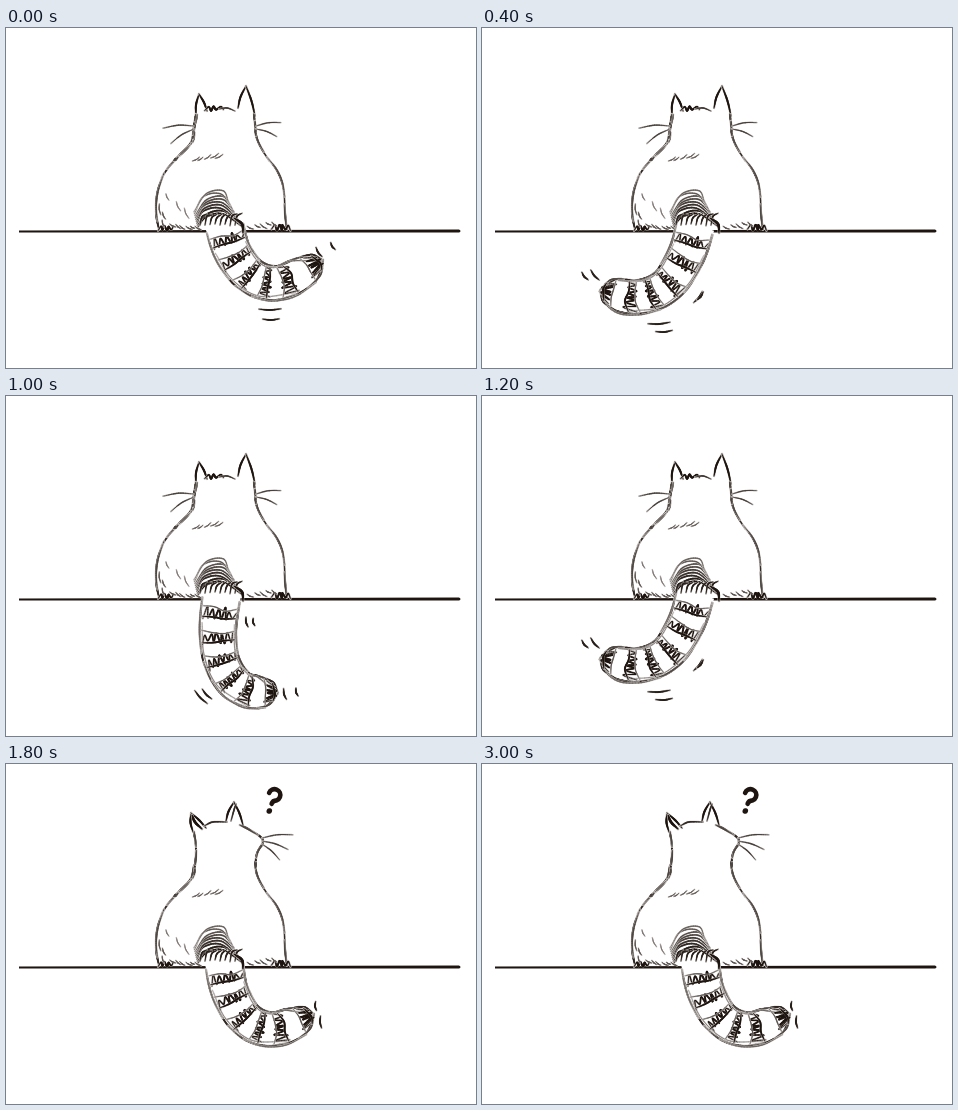
Recreate the animation shown at these times as an HTML page with a canvas. Size 470 px wide and 340 px high, loop 3200 ms.

```html
<!DOCTYPE html>
<html lang="en">
<head>
<meta charset="utf-8">
<title>Cat on a ledge</title>
<style>
html, body { margin: 0; width: 100%; height: 100%; overflow: hidden; background: #fff; }
canvas { display: block; width: 470px; height: 340px; }
</style>
</head>
<body>
<canvas id="stage" width="470" height="340"></canvas>
<script>
const ctx = document.getElementById('stage').getContext('2d');
const STEP = 200;
// One letter per step: tail right, centre, left, then glance and stare.
const POSES = 'ACLCACLCAQFFFFFQ';

let seed = 1;
function rnd(size = 1) {
  seed = (seed * 16807) % 2147483647;
  return (seed / 2147483647 - 0.5) * size;
}

const shade = g => `rgb(${30 + g * 210},${21 + g * 216},${16 + g * 219})`;
const polar = (x, y, a, r) => [x + Math.cos(a) * r, y + Math.sin(a) * r];
const rad = deg => deg * Math.PI / 180;

// Point on a Catmull-Rom curve, u from 0 to 1.
function at(p, u) {
  const last = p.length / 2 - 1, t = u * last;
  const i = Math.max(0, Math.min(last - 1, Math.floor(t))), f = t - i;
  return [0, 1].map(k => {
    const v = j => j < 0 ? 2 * p[k] - p[2 + k]
      : j > last ? 2 * p[2 * last + k] - p[2 * last - 2 + k] : p[2 * j + k];
    const a = v(i - 1), b = v(i), c = v(i + 1), d = v(i + 2);
    return b + 0.5 * f * (c - a + f * (2 * a - 5 * b + 4 * c - d + f * (3 * (b - c) + d - a)));
  });
}

// Tapered brush stroke with a soft rim through points x, y, x, y...
function ink(w, g, ...p) {
  const n = Math.max(6, p.length * 3);
  const pts = Array.from({ length: n + 1 }, (_, i) => at(p, i / n));
  ctx.lineCap = ctx.lineJoin = 'round';
  ctx.strokeStyle = shade(0.75 + g * 0.25);
  ctx.lineWidth = w * 0.7 + 0.9;
  ctx.beginPath();
  pts.forEach(q => ctx.lineTo(...q));
  ctx.stroke();
  ctx.strokeStyle = shade(g);
  for (let i = 0; i < n; i++) {
    ctx.lineWidth = w * (0.35 + 0.65 * Math.sin(Math.PI * (i + 0.5) / n));
    ctx.beginPath();
    ctx.moveTo(...pts[i]);
    ctx.lineTo(...pts[i + 1]);
    ctx.stroke();
  }
}

// Pencil-like line: short overlapping strokes that wander off the curve.
function sketch(w, passes, curve) {
  for (let k = 0; k < passes; k++) {
    let u = 0;
    while (u < 0.95) {
      const end = Math.min(1, u + 0.35 + rnd(0.2));
      const dx = rnd(k * 1.5), dy = rnd(k * 1.5);
      const p = [0, 1, 2, 3].flatMap(j => {
        const [x, y] = curve(u + (end - u) * j / 3);
        return [x + dx, y + dy];
      });
      ink(w * (1 - k * 0.15), k * 0.15 + 0.08, ...p);
      u = end - 0.04 + k * 0.1;
    }
  }
}

const along = (...p) => u => at(p, u);

// Row of short hairs between two points, all leaning one way.
function hairs(n, x0, y0, x1, y1, deg, len, w = 1.1, g = 0.3) {
  for (let i = 0; i < n; i++) {
    const u = i / (n - 1);
    const x = x0 + (x1 - x0) * u + rnd(2), y = y0 + (y1 - y0) * u + rnd(2);
    const a = rad(deg) + rnd(0.4), l = len * (1 + rnd(0.5));
    ink(w, g, x, y, ...polar(x, y, a + 0.15, l / 2), ...polar(x, y, a, l));
  }
}

function scribble(n, x0, y0, x1, y1, height, w) {
  const p = [];
  for (let i = 0; i <= n; i++) {
    p.push(x0 + (x1 - x0) * i / n + rnd(2), y0 + (y1 - y0) * i / n + (i % 2 ? height : 0) + rnd(1.5));
  }
  ink(w, 0, ...p);
}

function whiskers(x, y, n, deg, spread, len) {
  for (let i = 0; i < n; i++) {
    const a = rad(deg + spread * i), l = len * (1 - i * 0.12);
    const y0 = y + i * 3;
    ink(1.2, 0.2, x, y0, ...polar(x, y0, a - rad(spread / 4), l / 2), ...polar(x, y0, a, l));
  }
}

function ear(x0, y0, tipX, tipY, x1, y1) {
  const mid = (x, y, out) => [(x + tipX) / 2 + out, (y + tipY) / 2];
  ink(2, 0, x0, y0, ...mid(x0, y0, -1.5), tipX, tipY);
  ink(2, 0, tipX, tipY, ...mid(x1, y1, 1), x1, y1);
}

function ledge() {
  ctx.fillStyle = shade(0);
  ctx.beginPath();
  ctx.moveTo(13, 202.4);
  ctx.lineTo(453, 201.4);
  ctx.quadraticCurveTo(456, 203, 453, 204.6);
  ctx.lineTo(13, 204.4);
  ctx.fill();
}

function body() {
  const left = along(188, 101, 185, 115, 170, 131, 157, 147, 151, 167, 150, 185, 153, 202);
  const right = along(249, 101, 252, 114, 262, 131, 273, 146, 278, 164, 279, 184, 281, 202);
  sketch(1.9, 2, left);
  sketch(1.7, 2, right);
  sketch(2.2, 3, u => left(0.03 + u * 0.32));
  scribble(7, 152, 202, 167, 202, -4, 1.9);
  scribble(8, 266, 202, 284, 202, -5, 2);
  hairs(6, 164, 197, 190, 199, 35, 6);
  hairs(5, 242, 198, 266, 194, 30, 7);
  hairs(5, 186, 133, 210, 130, -38, 8, 1, 0.35);
  hairs(3, 154, 176, 157, 192, 75, 9);
  hairs(3, 160, 166, 179, 180, 70, 9, 0.9, 0.45);
}

// Fur fanning over the root of the tail.
function rump() {
  for (let i = 0; i < 9; i++) {
    const rise = 6 + i * 2.9, lean = rnd(4);
    ink(1.8 - i * 0.07, i * 0.045, 192 - i * 0.5, 199 - i * 1.9, 199 + lean, 195 - rise,
      216 + lean, 192 - rise, 237 - i * 1.8, 200 - i * 3.2 + rnd(2));
  }
  for (let i = 0; i < 8; i++) {
    const x = 194 + i * 5;
    ink(1.5, 0.05, x, 197 + rnd(3), x + 2, 189 + rnd(2), x + 7, 186 + rnd(3));
  }
  ink(2.6, 0, 228, 190, 236, 196, 237, 205);
}

function tail(...spine) {
  const side = (u, v) => {
    const [x0, y0] = at(spine, u - 0.01), [x1, y1] = at(spine, u + 0.01);
    const round = Math.sqrt(Math.max(0, 1 - Math.max(0, (u - 0.83) / 0.17) ** 2));
    return polar((x0 + x1) / 2, (y0 + y1) / 2, Math.atan2(y1 - y0, x1 - x0) + Math.PI / 2, v * (19 - 3 * u) * round);
  };
  ctx.fillStyle = '#fff';
  ctx.beginPath();
  for (const v of [-1, 1]) {
    for (let i = 0; i <= 40; i++) ctx.lineTo(...side(v < 0 ? i / 40 : 1 - i / 40, v));
  }
  ctx.fill();
  for (const v of [-1, 1]) {
    sketch(1.8, 3, u => side(0.04 + u * 0.96, v));
    ink(1, 0.5, ...[0.2, 0.4, 0.6, 0.8].flatMap(u => side(u, v * 0.88)));
  }

  // Each stripe is a loose zigzag between two uneven rims.
  for (let u = 0.13; u < 0.97; u += 0.163) {
    const rim = d => [-0.9, -0.3, 0.3, 0.9].flatMap(v => side(u + d + rnd(0.02) - v * v * 0.015, v));
    const zig = [];
    for (let i = 0; i <= 11; i++) {
      zig.push(...side(u + (i % 2 ? 0.034 : -0.03) + rnd(0.03), -0.85 + i * 0.155 + rnd(0.12)));
    }
    ink(1.8, 0, ...zig);
    ink(1.8, 0, ...rim(0.035));
    ink(1.1, 0.3, ...rim(-0.028));
  }
}

// Pairs of motion marks: place, step to the second, angle, length.
function swish(x, y, dx, dy, deg, len) {
  for (let i = 0; i < 2; i++) {
    const cx = x + dx * i, cy = y + dy * i, a = rad(deg), l = len * (1 - i * 0.25) / 2;
    ink(1.8, 0.05, ...polar(cx, cy, a, -l), ...polar(cx, cy, a + Math.PI / 2, 1), ...polar(cx, cy, a, l));
  }
}

const tails = {
  A() {
    tail(218, 196, 227, 225, 247, 249, 276, 254, 317, 232);
    swish(313, 224, 14, -6, 57, 11);
    swish(264, 281, 1, 10, -1, 22);
  },
  L() {
    tail(214, 197, 204, 228, 184, 258, 154, 269, 118, 262);
    swish(113, 247, -10, 1, 50, 13);
    swish(177, 295, 5, 8, -4, 22);
    swish(216, 269, 2, -1, -52, 14);
  },
  C() {
    tail(216, 198, 212, 235, 217, 269, 237, 293, 272, 297);
    swish(241, 226, 7, 0, 78, 10);
    swish(195, 301, 6, -3, 46, 18);
    swish(279, 298, 12, -2, 75, 11);
  },
  Q() {
    tail(218, 198, 224, 228, 241, 256, 269, 265, 308, 250);
    swish(315, 258, -5, -16, 85, 12);
  },
  F() {
    tail(214, 197, 210, 230, 222, 261, 247, 279, 283, 275);
  }
};

function backHead() {
  ear(190, 88, 193, 66, 201, 83);
  ear(232, 80, 240, 58, 249, 88);
  scribble(6, 199, 82, 217, 82, -3, 2);
  ink(1.3, 0.15, 213, 81, 221, 80, 229, 83);
  sketch(2, 3, along(190, 86, 188, 98, 187, 111));
  sketch(1.7, 2, along(248, 86, 249, 98, 250, 108));
  whiskers(188, 98, 2, 176, -28, 31);
  whiskers(250, 98, 2, -8, 28, 25);
}

function glanceHead() {
  ear(187, 68, 185, 49, 200, 64);
  ink(2.6, 0, 186, 51, 189, 58, 196, 65);
  ear(220, 57, 228, 38, 237, 61);
  ink(1.5, 0.1, 225, 57, 228, 46, 230, 40);
  ink(1.6, 0.1, 198, 62, 207, 58, 221, 58);
  sketch(1.9, 2, along(234, 61, 244, 66, 257, 76, 251, 89, 249, 104));
  sketch(1.8, 2, along(188, 68, 190, 86, 188, 111));
  whiskers(256, 74, 3, -6, 24, 31);
  question(268.5, 31, 5.8, 18);
}

function stareHead() {
  ear(202, 62, 208, 40, 217, 57);
  ink(2.2, 0, 205, 57, 206, 49, 209, 43);
  ear(229, 54, 237, 44, 239, 56);
  ink(2.4, 0, 232, 53, 235, 49, 237, 46);
  ink(1.5, 0.1, 211, 59, 219, 55, 230, 54);
  sketch(1.7, 2, along(238, 54, 247, 66, 257, 79));
  sketch(2, 3, along(203, 60, 191, 77, 187, 94, 186, 112));
  dot(237.5, 75, 3.1);
  dot(259.5, 82.5, 4);
  ink(1.9, 0.05, 262, 85, 263, 93, 256, 99, 246, 100, 240, 104);
  ink(1.8, 0.05, 254, 99, 254, 105, 249, 109);
  ink(1.3, 0.2, 246, 107, 243, 113, 243, 121);
  whiskers(243, 87, 3, 154, -18, 34);
  whiskers(264, 82, 2, 6, 28, 13);
  sketch(1.5, 1, along(251, 108, 252, 115, 258, 126));
  question(272, 27, 9.8, -17);
}

function dot(x, y, r) {
  ctx.fillStyle = shade(0);
  ctx.beginPath();
  ctx.arc(x, y, r, 0, 7);
  ctx.fill();
}

function question(x, y, r, tilt) {
  ctx.save();
  ctx.translate(x, y);
  ctx.rotate(rad(tilt));
  ctx.strokeStyle = shade(0);
  ctx.lineWidth = r * 0.8;
  ctx.beginPath();
  ctx.arc(0, 0, r, Math.PI * 1.02, Math.PI * 2.28);
  ctx.quadraticCurveTo(0, r, 0, r * 1.6);
  ctx.stroke();
  dot(0, r * 2.9, r * 0.48);
  ctx.restore();
}

const heads = { Q: glanceHead, F: stareHead };

function draw(pose) {
  seed = 77;
  ctx.fillStyle = '#fff';
  ctx.fillRect(0, 0, 470, 340);
  ledge();
  body();
  tails[pose]();
  rump();
  (heads[pose] || backHead)();
}

function frame() {
  draw(POSES[Math.floor(performance.now() / STEP) % POSES.length]);
  requestAnimationFrame(frame);
}
frame();
</script>
</body>
</html>
```
